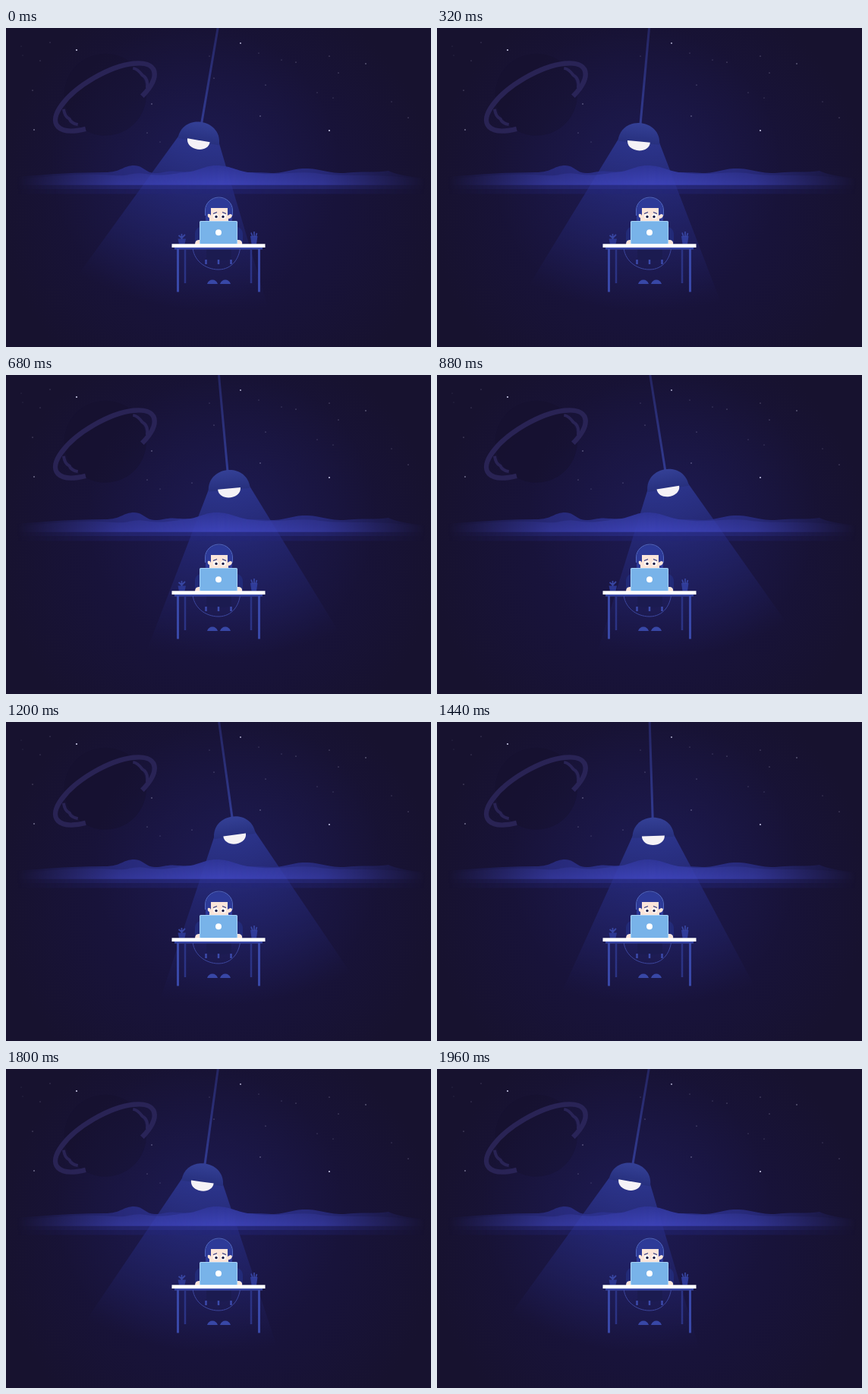
Recreate the animation shown at these times as an HTML page. Size 560 by 420 pixels, loop 2000 ms.

```html
<!DOCTYPE html>
<html lang="en">
<head>
<meta charset="utf-8">
<title>Night shift</title>
<style>
html, body { margin: 0; width: 100%; height: 100%; overflow: hidden; background: #17122f; }
svg { display: block; width: 100vw; height: 100vh; }
</style>
</head>
<body>
<svg viewBox="0 0 560 420" xmlns="http://www.w3.org/2000/svg">
  <defs>
    <radialGradient id="night" gradientUnits="userSpaceOnUse" cx="280" cy="225" r="290">
      <stop offset="0" stop-color="#1a1545"/>
      <stop offset=".55" stop-color="#18133a"/>
      <stop offset="1" stop-color="#17122f"/>
    </radialGradient>
    <radialGradient id="beam" gradientUnits="userSpaceOnUse" cx="280" cy="-5" r="378">
      <stop offset=".38" stop-color="#303c9c" stop-opacity=".85"/>
      <stop offset=".52" stop-color="#2c3590" stop-opacity=".7"/>
      <stop offset=".62" stop-color="#282f88" stop-opacity=".55"/>
      <stop offset=".8" stop-color="#252a7c" stop-opacity=".32"/>
      <stop offset="1" stop-color="#222470" stop-opacity="0"/>
    </radialGradient>
    <radialGradient id="halo">
      <stop offset="0" stop-color="#2a2f88" stop-opacity=".22"/>
      <stop offset="1" stop-color="#2a2f88" stop-opacity="0"/>
    </radialGradient>
    <linearGradient id="shade" x1="0" y1="0" x2="0" y2="1">
      <stop offset="0" stop-color="#344096"/>
      <stop offset="1" stop-color="#27307e"/>
    </linearGradient>
    <linearGradient id="cord" gradientUnits="userSpaceOnUse" x1="0" y1="0" x2="0" y2="126">
      <stop offset="0" stop-color="#252562"/>
      <stop offset="1" stop-color="#313a90"/>
    </linearGradient>
    <linearGradient id="side" gradientUnits="userSpaceOnUse" x1="15" y1="0" x2="552" y2="0">
      <stop offset="0" stop-color="#fff" stop-opacity="0"/>
      <stop offset=".25" stop-color="#fff" stop-opacity=".7"/>
      <stop offset=".5" stop-color="#fff"/>
      <stop offset=".75" stop-color="#fff" stop-opacity=".7"/>
      <stop offset="1" stop-color="#fff" stop-opacity="0"/>
    </linearGradient>
    <linearGradient id="ridge" gradientUnits="userSpaceOnUse" x1="0" y1="181" x2="0" y2="207">
      <stop offset="0" stop-color="#2f3596"/>
      <stop offset="1" stop-color="#3d43b8"/>
    </linearGradient>
    <mask id="fade" maskUnits="userSpaceOnUse" x="0" y="170" width="560" height="60">
      <rect y="170" width="560" height="60" fill="url(#side)"/>
    </mask>
  </defs>

  <rect width="560" height="420" fill="url(#night)"/>

  <g transform="translate(131 90) rotate(-30)" fill="none" stroke="#292354">
    <circle cx="1" cy="-2" r="54" fill="#161130" stroke="none" opacity=".8"/>
    <path d="M-44 24A73.5 29 0 1 1 42 24" stroke-width="6.5"/>
    <path d="M50-14Q55-10 56 0Q61 8 53 18M-56-13Q-60-4 -56 2Q-57 8 -50 14" stroke-width="4"/>
  </g>
  <g id="stars" fill="#c9c8e6"></g>

  <g id="lamp">
    <circle cx="280" cy="185" r="190" fill="url(#halo)"/>
    <path d="M280-30V128" stroke="url(#cord)" stroke-width="3"/>
    <path d="M253 149H307L417 372H143Z" fill="url(#beam)"/>
    <path d="M252.500 152C253 117 307 117 307.500 152Z" fill="url(#shade)"/>
    <path d="M265 150H295C295 166 265 166 265 150Z" fill="#f5f2f6"/>
  </g>

  <g mask="url(#fade)">
    <path d="M15 196Q80 190 130 190C152 190 154 181 169 181C181 181 184 191 196 191C208 191 213 187 227 189C250 190 320 189 350 191C370 191 376 185 394 185C416 185 420 191 445 191C470 188 488 191 504 188Q515 194 552 198V207H15Z" fill="#2d3290"/>
    <path d="M15 200Q90 190 142 194C162 196 166 189 184 192C212 196 222 191 236 190C255 188 262 181 277 181C298 181 306 190 328 191C354 195 382 188 408 191C440 197 490 190 552 200V207H15Z" fill="url(#ridge)"/>
    <rect x="15" y="206.500" width="537" height="5.500" fill="#2b2f8c" opacity=".75"/>
    <rect x="15" y="212" width="537" height="6.500" fill="#25277a" opacity=".45"/>
  </g>

  <g id="worker">
    <path d="M249 285V270Q250 261 262 261H300Q312 262 312 272V285Z" fill="#222a78"/>
    <path d="M264 291H297V304Q280 309 264 304Z" fill="#1b1b50"/>
    <path d="M263.500 305V311M280 305V311M296.500 305V311" stroke="#3c4bac" stroke-width="2.500"/>
    <path d="M265 337Q267 331.500 272 331.500T279 337ZM282 337Q284 331.500 289 331.500T296 337Z" fill="#3847a6"/>
    <path d="M263 254V239Q264 224 280.500 224T298 239V254Z" fill="#2d3a98"/>
    <path d="M268 256V250Q265 249 266 245Q269 244 270 247V237H292V247Q297 243 298 247Q297 251 293 251V256Z" fill="#fbe5da"/>
    <path d="M262.500 247V240A18 17 0 0 1 298.500 240V247" fill="none" stroke="#5268c0" stroke-width="1"/>
    <g fill="#fff"><circle cx="276.500" cy="248" r="3.200"/><circle cx="286.500" cy="248" r="3.200"/></g>
    <g fill="#1b1a45"><circle cx="277" cy="248.500" r="1.700"/><circle cx="286" cy="248.500" r="1.700"/></g>
    <path d="M273 244.500L278 242.500M285 242.500L290 244.500" stroke="#27307c" stroke-width="1.200"/>
  </g>

  <g id="desk">
    <path d="M236 292V336M323 292V336" stroke="#2b3384" stroke-width="2.500"/>
    <path d="M226.500 290V347.500M333.500 290V347.500" stroke="#3948a8" stroke-width="3"/>
    <rect x="222" y="289" width="116" height="2.500" fill="#3948a8"/>
    <path d="M246 287C246 305 262 318 280 318S309 303 309 283" fill="none" stroke="#3d479f" stroke-width="1"/>
    <path d="M226.500 277.500H237L235.500 284.500H228Z" fill="#2c3791"/>
    <path d="M231.500 278V271M231 276L227.500 273M232 276L236 272" stroke="#3846a2" stroke-width="1.800"/>
    <path d="M322 274H331.500L330 284.500H323.500Z" fill="#303c9a"/>
    <path d="M325 275L323 269.500M327 275V268M329 275L330.500 270" stroke="#3846a2" stroke-width="1.700"/>
    <path d="M249 285Q249 279 254 279H257V285ZM304 285V279H307Q312 280 311 285Z" fill="#fbe5da"/>
    <rect x="255" y="254" width="50" height="31" rx="1.500" fill="#a7d2f5"/>
    <rect x="256" y="255" width="48" height="29" rx="1" fill="#78b3e9"/>
    <circle cx="280" cy="269.300" r="4" fill="#fff"/>
    <rect x="218.500" y="284.300" width="123" height="4.700" fill="#fff"/>
  </g>
</svg>
<script>
const LOOP = 2000, STEP = 40, SWING = 9.7;
const lamp = document.getElementById('lamp');

// x, y, radius
const stars = [
  [93, 29, 1.1], [426, 135, 1.1], [309, 20, .9], [37, 134, .8], [474, 47, .7],
  [192, 100, .7], [335, 116, .7], [530, 118, .6], [45, 43, .5], [58, 19, .5],
  [35, 82, .6], [22, 36, .4], [20, 24, .4], [186, 138, .6], [203, 150, .5],
  [274, 66, .6], [268, 37, .5], [245, 142, .6], [342, 75, .6], [363, 42, .5],
  [382, 45, .6], [410, 85, .5], [426, 37, .6], [438, 59, .6], [431, 92, .5],
  [508, 97, .5], [333, 33, .5]
];
document.getElementById('stars').innerHTML = stars.map(([x, y, r]) =>
  `<circle cx="${x}" cy="${y}" r="${r}" opacity="${Math.min(1, r + .05)}"/>`).join('');

function draw(ms) {
  const t = Math.floor((ms % LOOP) / STEP) * STEP;
  const angle = SWING * Math.cos(2 * Math.PI * t / LOOP);
  lamp.setAttribute('transform', `rotate(${angle.toFixed(3)} 280 -5)`);
}

const start = performance.now();
function tick() {
  draw(performance.now() - start);
  requestAnimationFrame(tick);
}
tick();
</script>
</body>
</html>
```
